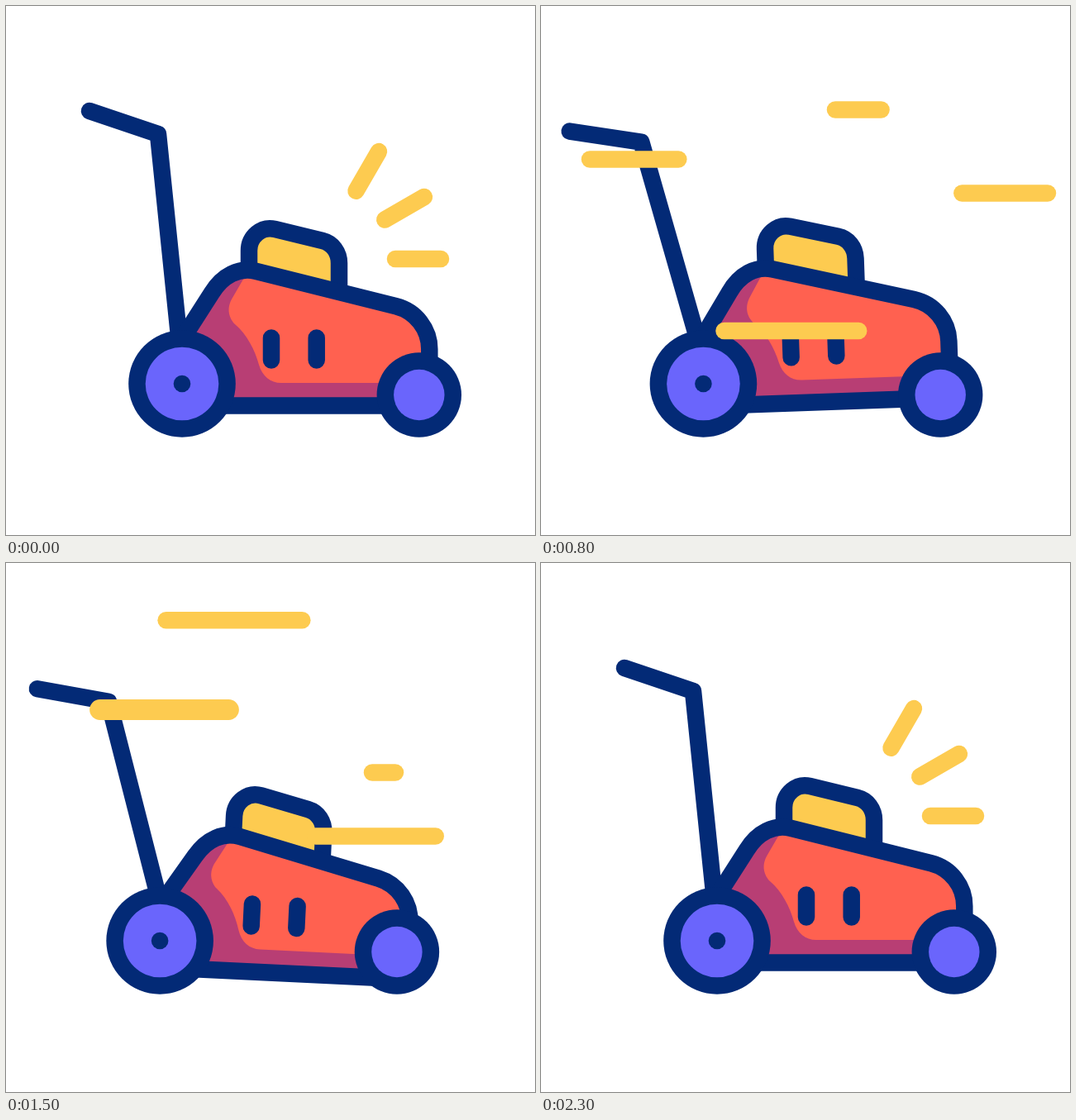
Recreate the animation shown at these times as an HTML page with a canvas. Size 640 px wide and 640 px high, loop 2.4 s.

```html
<!DOCTYPE html>
<html lang="en">
<head>
<meta charset="utf-8">
<title>Lawn mower</title>
<style>
  html, body { margin: 0; width: 100%; height: 100%; overflow: hidden; background: #fff; }
  canvas { display: block; width: 640px; height: 640px; }
</style>
</head>
<body>
<canvas id="stage" width="640" height="640"></canvas>
<script>
const ctx = document.getElementById('stage').getContext('2d');
const LOOP = 2400, STEP = 20, LINE = 20.5;
const NAVY = '#032a76', RED = '#ff6150', PLUM = '#b83e74', YELLOW = '#fdcb50', VIOLET = '#6a65fc';

const clamp01 = v => Math.min(1, Math.max(0, v));
const mix = (a, b, k) => a + (b - a) * k;
const ease = (t, start, length) => (1 - Math.cos(Math.PI * clamp01((t - start) / length))) / 2;

// Starts at 0 and swings smoothly to each [time, value] pose in turn.
function swings(...poses) {
  return t => {
    let from = 0, start = 0;
    for (const [end, to] of poses) {
      if (t < end) return mix(from, to, ease(t, start, end - start));
      [start, from] = [end, to];
    }
    return from;
  };
}

const drive = swings([590, -46], [1085, 31], [1640, -37], [2160, 0]);
const bounce = swings([240, 3], [560, 3], [1040, -12.4], [1500, 13], [1780, -3.6], [2200, 0]);
const tilt = swings([580, -2.6], [1600, 2.9], [2040, 0]);
const lean = swings([600, -4.9], [1120, -14.8], [2280, 0]);

const shell = 'M208 411 L249 347 C262 326 282 315.8 302 320.8 L472 363.3 C496 369.5 512.3 391 512.3 415';
const shapes = {
  shell: new Path2D(shell + ' V436'),
  bodyFill: new Path2D(shell + ' V483.5 H230 L213 457 Z'),
  bodyLight: new Path2D('M292 322 L274 353 C266 366 270 378 277 385 C292 398 301 416 306 434 ' +
    'C310 448 320 456 333 456 H512 V415 C512 391 496 370 472 364 L302 321.5 Z'),
  floor: new Path2D('M240 483.5 H480'),
  hood: new Path2D('M294 320 V296 C294 279 309 266 325.5 270 L383 284 C395 287 403 298 403 311 V346'),
  vents: new Path2D('M321 401.5 V428.5 M375.7 401.5 V428.5'),
  handle: new Path2D('M101 127 L184 155 L210.5 413')
};

const STREAK = { length: 200, time: 430, lag: 265 };
const streaks = [
  { y: 125.5, x: 556, begin: 257 },
  { y: 185.5, x: 259, begin: 330 },
  { y: 393, x: 394, begin: 474 },
  { y: 226.5, x: 613, begin: 580 },
  { y: 330.5, x: 574, begin: 1085 },
  { y: 69.3, x: 377, begin: 1150 },
  { y: 177.5, x: 273, begin: 1198, width: 25 },
  { y: 253.5, x: 471, begin: 1395 }
];

function stroke(path, color = NAVY, width = LINE) {
  ctx.strokeStyle = color;
  ctx.lineWidth = width;
  ctx.stroke(path);
}

function fill(path, color) {
  ctx.fillStyle = color;
  ctx.fill(path);
}

function line(x0, x1, y, width) {
  if (Math.abs(x1 - x0) < 0.1) return;
  const path = new Path2D();
  path.moveTo(x0, y);
  path.lineTo(x1, y);
  stroke(path, YELLOW, width);
}

function disc(x, y, r, color) {
  const path = new Path2D();
  path.arc(x, y, r, 0, Math.PI * 2);
  fill(path, color);
}

function wheel(x, y, r) {
  disc(x, y, r, NAVY);
  disc(x, y, r - LINE, VIOLET);
}

function rotateAbout(x, y, degrees) {
  ctx.translate(x, y);
  ctx.rotate(degrees * Math.PI / 180);
  ctx.translate(-x, -y);
}

function drawMower(t) {
  ctx.save();
  ctx.translate(drive(t), 0);

  ctx.save();
  ctx.translate(0, bounce(t));
  rotateAbout(365, 480, tilt(t));
  ctx.save();
  rotateAbout(213, 407, lean(t));
  stroke(shapes.handle);
  ctx.restore();
  fill(shapes.hood, YELLOW);
  stroke(shapes.hood);
  fill(shapes.bodyFill, PLUM);
  fill(shapes.bodyLight, RED);
  for (const part of ['shell', 'floor', 'vents']) stroke(shapes[part]);
  ctx.restore();

  wheel(213, 457, 64.8);
  disc(213, 457, 10.3, NAVY);
  wheel(499.8, 470.5, 51.2);
  ctx.restore();
}

// Three rays fan out from one centre, 30 degrees apart.
function drawRays(t) {
  for (let i = 0; i < 3; i++) {
    const returning = t > LOOP / 2;
    const inner = returning ? 0 : ease(t, 15 + 95 * i, 130);
    const outer = returning ? ease(t, 2160 - 100 * i, 130) : 1;
    ctx.save();
    ctx.translate(376, 306);
    ctx.rotate(-i * Math.PI / 6);
    line(mix(95, 150, inner), mix(95, 150, outer), 0);
    ctx.restore();
  }
}

// The head of a streak runs left and its tail follows.
function drawStreak({ y, x, begin, width }, t) {
  const at = start => x - STREAK.length * ease(t, start, STREAK.time);
  line(at(begin), at(begin + STREAK.lag), y, width);
}

function frame() {
  const t = Math.floor(performance.now() % LOOP / STEP) * STEP;
  ctx.fillStyle = '#fff';
  ctx.fillRect(0, 0, 640, 640);
  ctx.lineCap = ctx.lineJoin = 'round';
  drawMower(t);
  drawRays(t);
  streaks.forEach(streak => drawStreak(streak, t));
  requestAnimationFrame(frame);
}
frame();
</script>
</body>
</html>
```
